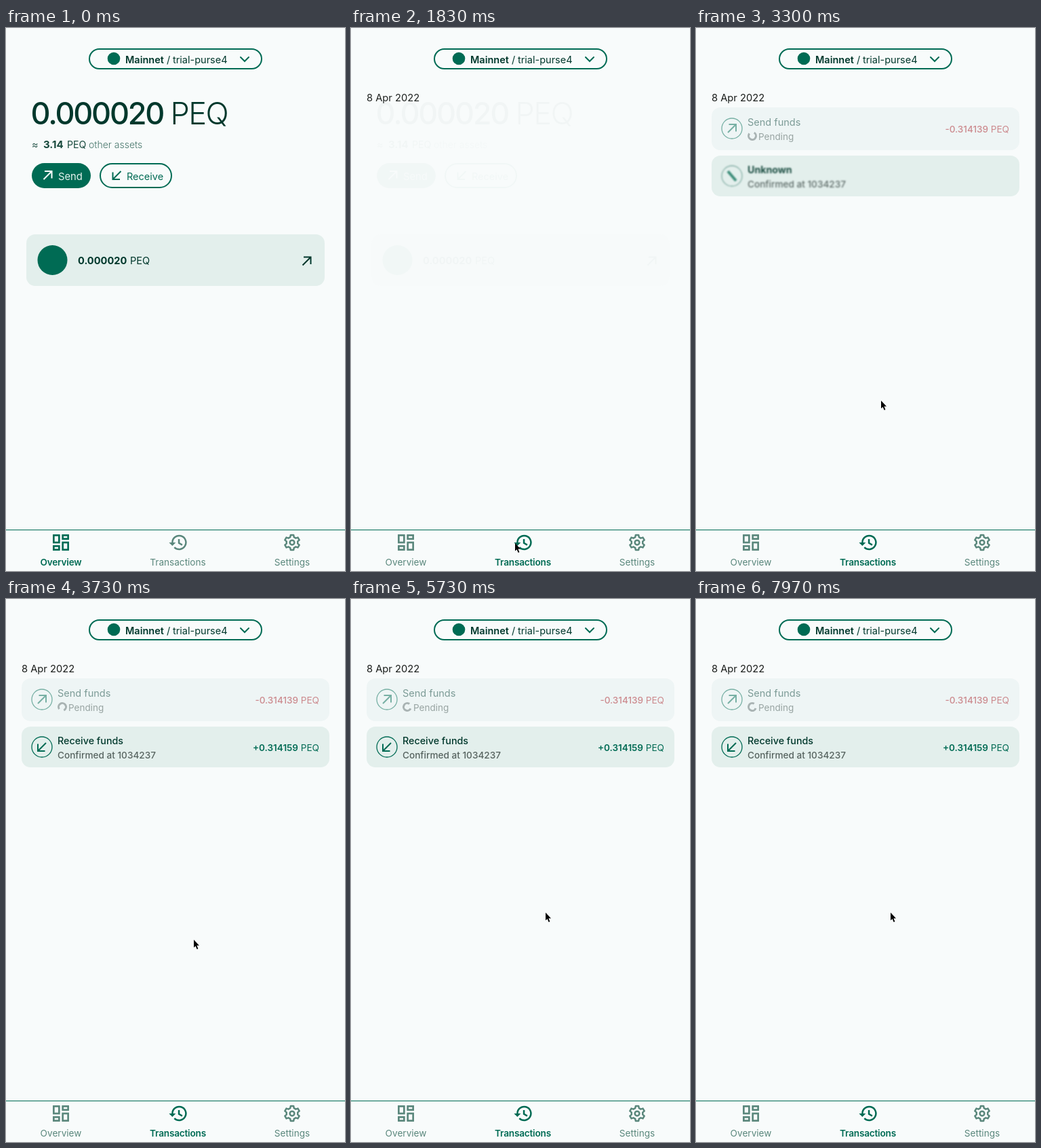
Write an HTML page that moves like this. It is 500 px wide and 800 px high and loops after 8 s.

```html
<!DOCTYPE html>
<html lang="en">
<head>
<meta charset="utf-8">
<title>Wallet</title>
<style>
  html, body { margin: 0; height: 100%; overflow: hidden; background: #f8fbfb; }
  svg { display: block; width: 100vw; height: 100vh; }
  text { font-family: Inter, "Open Sans", sans-serif; font-optical-sizing: none; }
  .line { fill: none; stroke: currentColor; stroke-width: 2; }
  .tab { color: #5a877c; }
  .tab text { font-size: 13.6px; fill: currentColor; text-anchor: middle; }
  .tab.on { color: #006b54; }
  .tab.on text { font-weight: 600; letter-spacing: -.2px; }
</style>
</head>
<body>
<svg id="stage" viewBox="0 0 500 800"></svg>
<script>
const LOOP = 8000, COIN = 'PEQ';
const TEAL = '#006b54', DARK = '#00382c', MUTED = '#7c9b96', CARD = '#e3efec', PALE = '#eef5f5';

const text = (x, y, size, weight, fill, str, extra = '') =>
  `<text x="${x}" y="${y}" font-size="${size}" font-weight="${weight}" fill="${fill}" ${extra}>${str}</text>`;
const box = (x, y, w, h, r, attrs) =>
  `<rect x="${x}" y="${y}" width="${w}" height="${h}" rx="${r}" ${attrs}/>`;
const arrow = (x, y, color, turn = 0) =>
  `<path class="line" color="${color}" transform="translate(${x} ${y}) rotate(${turn})" d="M-6 6L6-6M-4.5-6H6V4.5"/>`;
const ring = (y, color) =>
  `<circle cx="53" cy="${y}" r="15" fill="none" stroke="${color}" stroke-width="1.3"/>`;
const END = 'text-anchor="end"';
const amount = (y, weight, color, str) =>
  text(431, y, 13.5, weight, color, str, END) + text(462, y, 13.6, 400, color, COIN, END);
const tab = (id, x, scale, ox, icon, label) =>
  `<g class="tab" id="${id}"><g transform="translate(${x} 758) scale(${scale}) translate(${-ox} -12)">${icon}</g>
   <text x="${x}" y="792">${label}</text></g>`;

// Gear outline: six teeth, four corners each
function gear() {
  const pts = [];
  for (let k = 0; k < 6; k++)
    for (const [r, off] of [[6.7, -19], [9, -11], [9, 11], [6.7, 19]]) {
      const a = (k * 60 - 90 + off) * Math.PI / 180;
      pts.push((12 + r * Math.cos(a)).toFixed(2) + ',' + (12 + r * Math.sin(a)).toFixed(2));
    }
  return `<polygon class="line" stroke-linejoin="round" points="${pts.join(' ')}"/>
          <circle class="line" cx="12" cy="12" r="2.7"/>`;
}

const tiles = [[4, 4, 6, 8], [14, 4, 6, 4], [14, 12, 6, 8], [4, 16, 6, 4]]
  .map(t => box(...t, 0, 'class="line"')).join('');
const clock = `<path class="line" d="M5 12a8 8 0 1 1 2.35 5.65M12.75 8v4.6l3.9 2.3"/>
  <path fill="currentColor" d="M1 12h8l-4 4z"/>`;

const header =
  box(123, 31, 254, 29, 14.5, `fill="none" stroke="${TEAL}" stroke-width="2"`) +
  `<circle cx="159" cy="45" r="9.3" fill="${TEAL}"/>` +
  text(176, 52, 14.5, 600, DARK, 'Mainnet') +
  text(237, 52, 14.5, 400, DARK, '/') + text(246, 52, 14.5, 400, DARK, 'trial-purse4') +
  `<path class="line" color="${TEAL}" stroke-linecap="round" d="M346 43l6 6 6-6"/>`;

const overview = `<g id="overview">` +
  text(36.5, 141.5, 45, 500, DARK, '0.000020', 'letter-spacing="-2.2"') +
  text(242.5, 141.5, 45, 300, DARK, COIN, 'letter-spacing="-1.5"') +
  text(38, 177, 14.5, 400, '#2c5a4e', '≈') +
  text(55, 177, 15, 700, '#17493c', '3.14') +
  text(90, 177, 14.2, 400, '#17493c', COIN) +
  text(122, 177, 14, 300, '#46756a', 'other assets') +
  box(38, 199, 87, 37, 18.5, `fill="${TEAL}"`) + arrow(61.5, 217, '#fff') +
  text(77, 224, 14.8, 400, '#e6f3ef', 'Send') +
  box(139, 200, 105, 35, 17.5, `fill="none" stroke="${TEAL}" stroke-width="2"`) +
  arrow(163.5, 217, TEAL, 180) + text(178, 224, 14.5, 400, TEAL, 'Receive') +
  box(30, 304, 440, 76, 13, `fill="${CARD}"`) +
  `<circle cx="68.5" cy="342" r="22" fill="${TEAL}"/>` +
  text(106, 348, 14.6, 700, DARK, '0.000020') + text(183, 348, 14.6, 400, DARK, COIN) +
  arrow(443.5, 343.5, DARK) + `</g>`;

const history =
  text(23, 108, 14.7, 400, '#191c1a', '8 Apr 2022', 'id="date"') +
  `<g id="cards">` + box(23, 117, 454, 63, 13, `fill="${PALE}"`) +
  box(23, 188, 454, 60, 13, `fill="${CARD}"`) + `</g>` +
  `<g id="pending">` + ring(148, '#77b0a4') + arrow(53, 148, '#77b0a4') +
  text(76, 144, 14.5, 400, MUTED, 'Send funds') +
  `<circle id="spinner" cx="83" cy="159" r="5.5" fill="none" stroke="#a9b3b3" stroke-width="3" pathLength="360" stroke-dasharray="280 80"/>` +
  text(92, 165, 13.5, 400, '#98a4a2', 'Pending') + amount(154, 500, '#cc8a8e', '-0.314139') + `</g>` +
  `<g id="unknown">` + ring(218, '#77a59c') + `<path d="M47 211l12 14" stroke="#26806a" stroke-width="4"/>` +
  text(76, 214, 14.2, 700, DARK, 'Unknown') +
  text(76, 235, 13.6, 500, '#4c5a57', 'Confirmed at 1034237') + `</g>` +
  `<g id="received">` + ring(218, TEAL) + arrow(53, 218, TEAL, 180) +
  text(76, 214, 14.3, 500, DARK, 'Receive funds') +
  text(76, 235, 13.6, 500, '#56635f', 'Confirmed at 1034237') +
  amount(224, 600, TEAL, '+0.314159') + `</g>`;

const nav = `<path d="M0 739.5H500" stroke="${TEAL}"/>` +
  tab('tabOverview', 81, 1.33, 12, tiles, 'Overview') +
  tab('tabHistory', 253.5, 1.25, 11.5, clock, 'Transactions') +
  tab('tabSettings', 422, 1.25, 12, gear(), 'Settings');

const $ = id => document.getElementById(id);
$('stage').innerHTML = header + overview + history + nav +
  `<path id="cursor" d="M0 0V11.5L2.6 9.2 4.6 14 6.4 13.2 4.4 8.6H8Z"/>`;

// Pointer path: time, x, y
const path = [[0, 304, 112], [170, 304, 112], [1000, 242, 758], [1800, 242, 758], [2300, 248, 770],
  [2500, 250, 770], [2630, 253, 755], [2770, 260, 693], [3100, 269, 585], [3470, 276, 519],
  [3730, 277, 502], [4200, 287, 462], [LOOP, 287, 462]];

const ramp = (t, a, b) => Math.min(1, Math.max(0, (t - a) / (b - a)));
const smooth = k => k * k * (3 - 2 * k);

function pointer(t) {
  const i = path.findIndex(p => p[0] > t), a = path[i - 1], b = path[i];
  const k = ramp(t, a[0], b[0]), e = t < 1000 ? smooth(k) : k;
  return [1, 2].map(n => Math.round(a[n] + (b[n] - a[n]) * e));
}

function reveal(id, p) {
  const s = $(id).style;
  s.opacity = Math.sqrt(p);
  s.filter = p > 0 && p < 1 ? `blur(${5 * (1 - p)}px)` : 'none';
}

function draw(t) {
  const moved = t >= 1430, swap = ramp(t, 1430, 1840);
  $('tabOverview').classList.toggle('on', !moved);
  $('tabHistory').classList.toggle('on', moved);
  $('overview').style.opacity = 1 - swap;
  $('date').style.opacity = swap;
  $('cards').style.opacity = ramp(t, 2640, 2760);
  const shown = ramp(t, 2640, 2900);
  reveal('pending', shown);
  reveal('unknown', shown * (1 - ramp(t, 3250, 3480)));
  reveal('received', ramp(t, 3400, 3740));
  $('spinner').setAttribute('transform', `rotate(${(t - 2760) / 750 * 360 + 40} 83 159)`);
  $('cursor').setAttribute('transform', `translate(${pointer(t)})`);
  $('cursor').style.opacity = t < 30 ? 0 : 1;
}

const start = performance.now();
function tick() {
  draw((performance.now() - start) % LOOP);
  requestAnimationFrame(tick);
}
tick();
</script>
</body>
</html>
```
